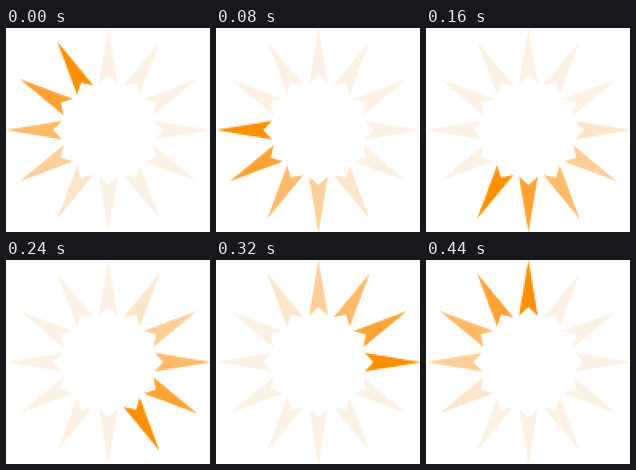
Recreate the animation shown at these times as an HTML page with a canvas. Size 256 by 256 pixels, loop 480 ms.

```html
<!DOCTYPE html>
<html lang="en">
<head>
<meta charset="utf-8">
<title>Loading spinner</title>
<style>
html, body { margin: 0; width: 100%; height: 100%; overflow: hidden; background: #fff; }
canvas { display: block; width: 100vw; height: 100vh; image-rendering: pixelated; }
</style>
</head>
<body>
<canvas id="stage" width="128" height="128"></canvas>
<script>
const COUNT = 12, STEP = 40;
const TAIL = ['#ff9000', '#ffa233', '#ffba69', '#fdcf98', '#fde5c9'];
const REST = '#fcf2e3';
const RAY = new Path2D('M0-128.5L11.8-58.2L0-69L-11.8-58.2Z');
const ctx = document.getElementById('stage').getContext('2d');

// The canvas is half size, so edges keep their coarse pixel steps.
function draw(head) {
  ctx.setTransform(0.5, 0, 0, 0.5, 0, 0);
  ctx.clearRect(0, 0, 256, 256);
  ctx.translate(128.5, 128.2);
  for (let i = 0; i < COUNT; i++) {
    ctx.rotate(-2 * Math.PI / COUNT);
    ctx.fillStyle = TAIL[(i - head + COUNT) % COUNT] || REST;
    ctx.fill(RAY);
  }
}

const start = performance.now();
let shown = -1;
function tick() {
  const head = Math.floor((performance.now() - start) / STEP) % COUNT;
  if (head !== shown) draw(shown = head);
  requestAnimationFrame(tick);
}
tick();
</script>
</body>
</html>
```
